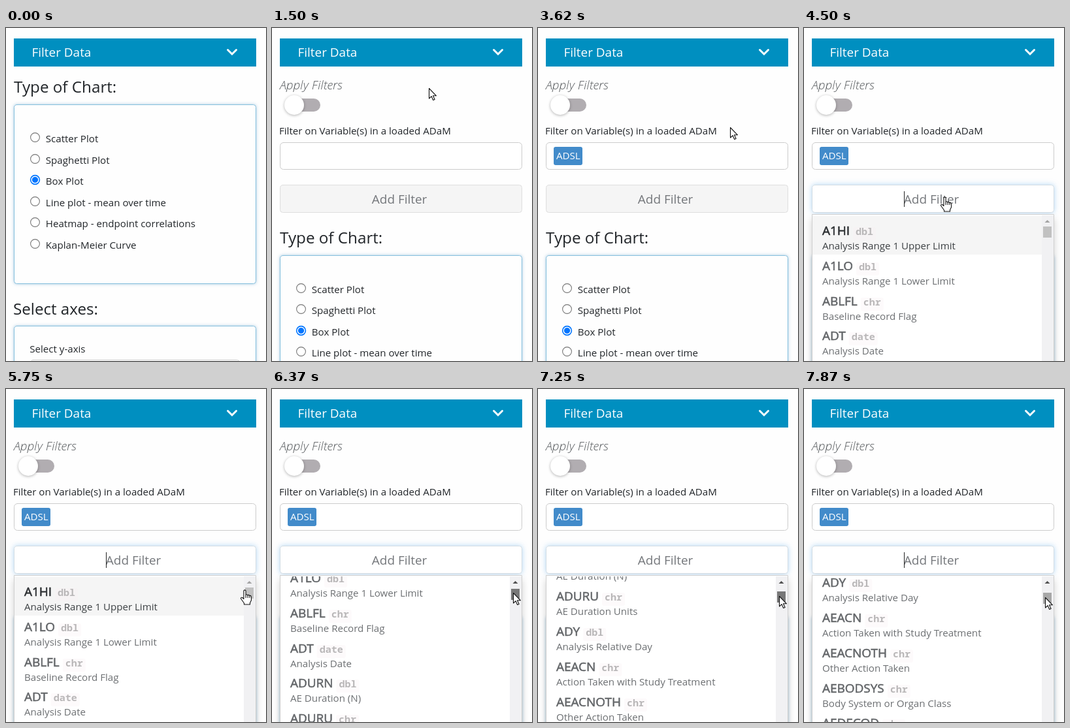
An HTML page with a canvas for the animation above (8 s loop, 398 px wide and 510 px high).

```html
<!DOCTYPE html>
<html lang="en">
<head>
<meta charset="utf-8">
<title>Filter Data</title>
<style>
html, body { margin: 0; width: 100%; height: 100%; overflow: hidden; background: #fefefe; }
canvas { display: block; }
</style>
</head>
<body>
<canvas id="stage" width="398" height="510"></canvas>
<script>
const ctx = document.getElementById('stage').getContext('2d');
const LOOP = 8000, BASE = 15.1, LARGE = 18.94;
const SANS = '"Open Sans", sans-serif';
const MONO = '"Noto Sans Mono", monospace';
const INK = '#212529', BLUE = '#66afe9';

const OPEN = 880, DROP = 2050, PICK = 2560, CLOSE = 3350, LIST = 4300;
const DRAG = 5950, RELEASE = 7700;
const PANEL = 230.7, ROW = 32.4, ITEM = 53.8, NOTCH = 37.4;
const notches = [6080, 6260, 6430, 6600, 6780, 6990, 7160, 7330, 7520];

const charts = ['Scatter Plot', 'Spaghetti Plot', 'Box Plot', 'Line plot - mean over time',
  'Heatmap - endpoint correlations', 'Kaplan-Meier Curve'];
const sets = ['ADSL', 'ADVS', 'ADAE', 'ADLBC', 'ADTTE'];
const vars = [
  ['A1HI', 'dbl', 'Analysis Range 1 Upper Limit'],
  ['A1LO', 'dbl', 'Analysis Range 1 Lower Limit'],
  ['ABLFL', 'chr', 'Baseline Record Flag'],
  ['ADT', 'date', 'Analysis Date'],
  ['ADURN', 'dbl', 'AE Duration (N)'],
  ['ADURU', 'chr', 'AE Duration Units'],
  ['ADY', 'dbl', 'Analysis Relative Day'],
  ['AEACN', 'chr', 'Action Taken with Study Treatment'],
  ['AEACNOTH', 'chr', 'Other Action Taken'],
  ['AEBODSYS', 'chr', 'Body System or Organ Class'],
  ['AEDECOD', 'chr', 'Dictionary-Derived Term']
];

// time, x, y of the pointer tip
const track = [
  [120, 262, 522], [750, 246, 40], [1000, 246, 40], [1500, 240, 92], [1900, 205, 190],
  [2120, 200, 195], [2480, 163, 240], [2800, 163, 240], [3320, 292, 150], [3620, 294, 152],
  [3780, 290, 158], [4180, 215, 258], [4480, 215, 258], [5050, 290, 300], [5600, 365, 307],
  [5800, 365, 307], [5950, 369, 310.5], [6870, 370, 315], [7520, 369, 318.5], [8000, 369, 318.5]
];
const arrow = new Path2D('M0 0V15.5L3.6 12.2L6.2 18L8.6 17L6 11.3H11Z');
const hand = new Path2D('M-1.6 1.6Q0 -.8 1.6 1.6V8Q3 6.4 4.6 8.5Q6 7 7.5 9.2Q9.2 8 10 10.6V16L8 20V22.5H-1V20.5L-6 13.5Q-6 11 -3.6 12L-1.6 14Z');

const clamp = v => Math.max(0, Math.min(1, v));
const smooth = v => v * v * (3 - 2 * v);

function pointerAt(t) {
  const i = track.findIndex(k => k[0] > t);
  if (i < 1) return null;
  const [t0, x0, y0] = track[i - 1], [t1, x1, y1] = track[i];
  const p = smooth((t - t0) / (t1 - t0));
  return [x0 + (x1 - x0) * p, y0 + (y1 - y0) * p];
}

function text(str, x, y, size = BASE, color = INK, style = '', family = SANS) {
  ctx.font = `${style} ${size}px ${family}`;
  ctx.fillStyle = color;
  ctx.fillText(str, x, Math.round(y));
}

function rect(x, y, w, h, color) {
  ctx.fillStyle = color;
  ctx.fillRect(x, y, w, h);
}

function round(x, y, w, h, r, fill, stroke) {
  ctx.beginPath();
  ctx.roundRect(x, y, w, h, r);
  if (fill) { ctx.fillStyle = fill; ctx.fill(); }
  if (stroke) {
    ctx.shadowColor = 'transparent';
    ctx.lineWidth = 1;
    ctx.strokeStyle = stroke;
    ctx.stroke();
  }
}

function shadowed(color, blur, dy, draw) {
  ctx.save();
  ctx.shadowColor = color;
  ctx.shadowBlur = blur;
  ctx.shadowOffsetY = dy;
  draw();
  ctx.restore();
}

function clipped(x, y, w, h, draw) {
  ctx.save();
  ctx.beginPath();
  ctx.rect(x, y, w, h);
  ctx.clip();
  draw();
  ctx.restore();
}

function header() {
  rect(12, 16, 371, 43, '#008fc0');
  text('Filter Data', 39.5, 44, LARGE, '#fff');
  ctx.beginPath();
  ctx.moveTo(339.5, 33.5);
  ctx.lineTo(346, 40);
  ctx.lineTo(352.5, 33.5);
  ctx.lineWidth = 3;
  ctx.lineCap = 'round';
  ctx.strokeStyle = '#fff';
  ctx.stroke();
}

function card(y, h) {
  shadowed('rgba(70,140,190,.55)', 5, 0, () => round(12.5, y + .5, 370, h, 4, '#fefefe', '#86c0de'));
}

function radio(y, on) {
  ctx.beginPath();
  ctx.arc(44.5, y, 6.9, 0, 7);
  ctx.fillStyle = '#fff';
  ctx.fill();
  ctx.lineWidth = on ? 1.6 : 1.1;
  ctx.strokeStyle = on ? '#0075ff' : '#767676';
  ctx.stroke();
  if (!on) return;
  ctx.beginPath();
  ctx.arc(44.5, y, 4.6, 0, 7);
  ctx.fillStyle = '#0075ff';
  ctx.fill();
}

function chartForm(shift) {
  const y = v => Math.round(v + shift);
  text('Type of Chart:', 12, y(99), 24.2);
  card(y(116.8), 274);
  charts.forEach((label, i) => {
    radio(y(167 + 32.5 * i) + .5, i === 2);
    text(label, 60.8, y(175 + 32.5 * i));
  });
  text('Select axes:', 11, y(439), 24.2);
  card(y(455.8), 200);
  text('Select y-axis', 36.3, y(497));
  round(37.5, y(508) + .5, 320, 40, 4, '#fff', '#ccc');
}

function filterForm(t) {
  text('Apply Filters', 12, 94, LARGE, '#55595c', 'italic 300');
  round(24, 108, 50, 20, 10, '#b1adb1');
  shadowed('rgba(0,0,0,.3)', 4, 1, () => round(19, 103, 30, 30, 15, '#fff'));
  text('Filter on Variable(s) in a loaded ADaM', 11, 163);

  const glow = Math.min(clamp((t - DROP) / 150), clamp((CLOSE + 150 - t) / 150));
  shadowed(`rgba(102,175,233,${.75 * glow})`, 8, 0, () => round(12.5, 175.5, 370, 41, 5, '#fff', '#ccc'));
  if (glow > 0) {
    ctx.globalAlpha = glow;
    round(12.5, 175.5, 370, 41, 5, null, BLUE);
    ctx.globalAlpha = 1;
  }
  if (t >= PICK) {
    round(24, 182, 44, 28, 3, '#428bca');
    text('ADSL', 28, 201, BASE, '#fff');
  }

  const active = t >= LIST;
  const focus = clamp((t - LIST) / 150);
  shadowed(`rgba(102,175,233,${.55 * focus})`, 9, 0, () =>
    round(12.5, 240.5, 370, 42, 4, active ? '#fff' : '#f5f5f5', active ? '#d3dde4' : '#dedede'));
  text('Add Filter', 152.8, 269, LARGE, '#74777b');
  if (active && (t - LIST) % 1060 < 530) rect(153, 250, 1, 24, '#222');
}

function menu(y, h) {
  shadowed('rgba(0,0,0,.2)', 12, 6, () => round(12.5, y + .5, 370, h, [0, 0, 4, 4], '#fff', '#d0d0d0'));
}

function setMenu(t) {
  const options = t < PICK ? sets : sets.slice(1);
  menu(221, 13 + ROW * options.length);
  rect(13, 227, 369, 33, '#f5f5f5');
  options.forEach((name, i) => text(name, 28, 249 + ROW * i, BASE, '#3c4043'));
}

function varRow([name, type, label], y, lit) {
  const color = lit ? '#2d3033' : '#64676a';
  if (lit) rect(13, y - 29, 351, 59, '#f5f5f5');
  text(name, 28, y, LARGE, color);
  const x = 28 + ctx.measureText(name).width + 9;
  ctx.lineWidth = .6;
  ctx.strokeStyle = color;
  ctx.strokeText(name, 28, Math.round(y));
  round(x - 4, y - 12, type.length * 9 + 8, 20, 3, lit ? '#f6f3f4' : '#fdfafb');
  text(type, x, y, 15, '#b9b7b8', 'bold', MONO);
  text(label, 28, y + 22, BASE, lit ? '#3c4043' : '#6c6f72');
}

function scrollbar(t, scroll) {
  rect(364, 287, 18, 223, '#f1f1f3');
  ctx.beginPath();
  ctx.moveTo(368.5, 298);
  ctx.lineTo(372.5, 294);
  ctx.lineTo(376.5, 298);
  ctx.fillStyle = scroll ? '#505050' : '#a3a3a3';
  ctx.fill();
  const held = t >= DRAG && t < RELEASE;
  const color = held ? '#787878' : t < DRAG ? '#c1c1c1' : '#a8a8a8';
  rect(366, Math.round(304 + scroll * 8 / 337), 13, 17, color);
}

function varMenu(t) {
  const scroll = NOTCH * notches.filter(n => n <= t).length;
  menu(285, 260);
  clipped(13, 287, 369, 223, () => {
    vars.forEach((v, i) => varRow(v, Math.round(317 + ITEM * i - scroll), i === 0));
    scrollbar(t, scroll);
  });
}

function pointer(t) {
  const pos = pointerAt(t);
  if (!pos) return;
  const [x, y] = pos;
  const onMenu = t >= DROP && t < CLOSE && y > 221;
  const onList = t < DRAG - 80 && t > 4000 && y > 240;
  const shape = y < 59 || onMenu || onList ? hand : arrow;
  ctx.save();
  ctx.translate(Math.round(x) + .5, Math.round(y) + .5);
  ctx.lineJoin = 'round';
  ctx.lineWidth = 1.1;
  ctx.fillStyle = '#fff';
  ctx.strokeStyle = '#111';
  ctx.fill(shape);
  ctx.stroke(shape);
  if (shape === hand) {
    ctx.beginPath();
    for (const dx of [1.6, 4.6, 7.5]) {
      ctx.moveTo(dx, 8.5);
      ctx.lineTo(dx, 12);
    }
    ctx.stroke();
  }
  ctx.restore();
}

function draw(t) {
  const shift = PANEL * smooth(clamp((t - OPEN) / 350));
  rect(0, 0, 398, 510, '#fefefe');
  chartForm(shift);
  if (shift > 0) clipped(0, 60, 398, shift + 10, () => filterForm(t));
  header();
  if (t >= DROP && t < CLOSE) setMenu(t);
  if (t >= LIST) varMenu(t);
  pointer(t);
}

const start = performance.now();
function tick() {
  draw((performance.now() - start) % LOOP);
  requestAnimationFrame(tick);
}
tick();
</script>
</body>
</html>
```
